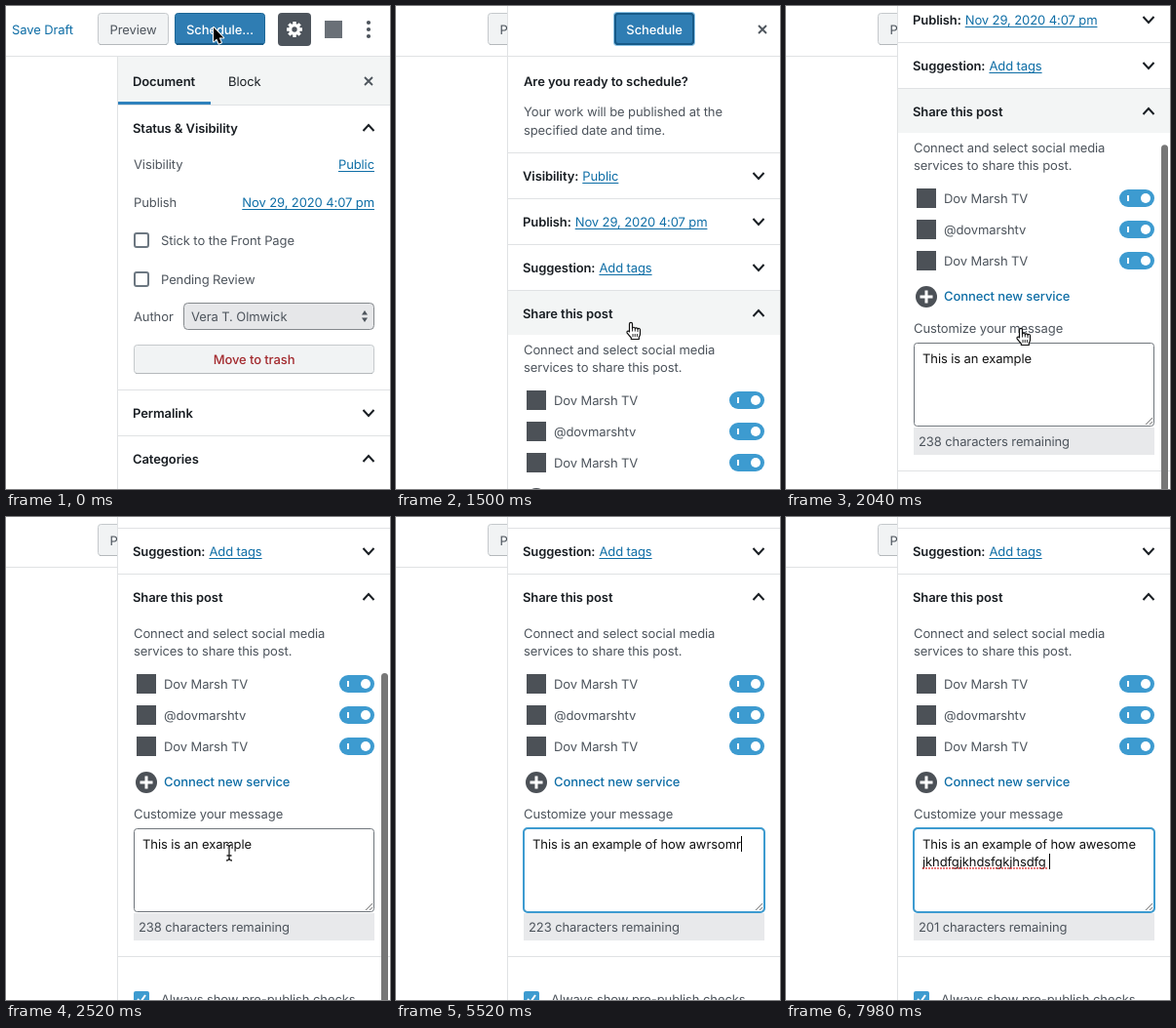
An HTML page with a canvas for the animation above (8000 ms loop, 394x495 px).

```html
<!DOCTYPE html>
<html lang="en">
<head>
<meta charset="utf-8">
<title>Schedule a post and share it</title>
<style>
  html, body { margin: 0; width: 100%; height: 100%; overflow: hidden; background: #fff; }
  canvas { display: block; width: 394px; height: 495px; }
</style>
</head>
<body>
<canvas id="stage"></canvas>
<script>
const W = 394, H = 495, LOOP = 8000;
const canvas = document.getElementById('stage');
const ctx = canvas.getContext('2d');
const dpr = window.devicePixelRatio || 1;
canvas.width = W * dpr;
canvas.height = H * dpr;

const INK = '#191e23', BODY = '#4d545c', LINK = '#0f6ea6', LINE = '#e0e2e4';
const BLUE = '#3d9bd0', HOVER = '#f3f5f5', BUTTON = '#2f7db3', ICON = '#4c5157';
const CHANNEL = 'Dov Marsh TV', HANDLE = '@dovmarshtv', AUTHOR = 'Vera T. Olmwick';
const DATE = 'Nov 29, 2020 4:07 pm';

const PANEL_AT = 300, SHARE_AT = 1260, SCROLL_AT = 1680, FOCUS_AT = 2820, TYPE_AT = 3480;
const MAX_SCROLL = 233;

const clamp = v => Math.max(0, Math.min(1, v));
const progress = (t, start, length) => clamp((t - start) / length);
const easeOut = p => 1 - (1 - p) ** 3;
const easeInOut = p => p * p * (3 - 2 * p);

// ---- drawing helpers ----
function setFont(weight) {
  ctx.font = `${weight} 13px Inter, "Open Sans", sans-serif`;
  ctx.letterSpacing = '-0.1px';
  ctx.textRendering = 'geometricPrecision';
}

// y is the middle of the capitals; returns the text width
function label(str, x, y, color = BODY, weight = 400, align = 'left') {
  setFont(weight);
  ctx.textAlign = align;
  ctx.fillStyle = color;
  ctx.fillText(str, x, y + 5);
  return ctx.measureText(str).width;
}

function link(str, x, y, align = 'left') {
  const w = label(str, x, y, LINK, 400, align);
  rect(align === 'right' ? x - w : x, y + 7, w, 1, LINK);
}

function rect(x, y, w, h, color) {
  ctx.fillStyle = color;
  ctx.fillRect(x, y, w, h);
}

function box(x, y, w, h, r, fill, stroke, lw = stroke ? 1 : 0) {
  ctx.beginPath();
  ctx.roundRect(x + lw / 2, y + lw / 2, w - lw, h - lw, r);
  if (fill) { ctx.fillStyle = fill; ctx.fill(); }
  if (stroke) { ctx.strokeStyle = stroke; ctx.lineWidth = lw; ctx.stroke(); }
}

function disc(x, y, r, color) {
  ctx.fillStyle = color;
  ctx.beginPath();
  ctx.arc(x, y, r, 0, 7);
  ctx.fill();
}

function lines(color, lw, ...paths) {
  ctx.strokeStyle = color;
  ctx.lineWidth = lw;
  ctx.beginPath();
  for (const p of paths) {
    ctx.moveTo(p[0], p[1]);
    for (let i = 2; i < p.length; i += 2) ctx.lineTo(p[i], p[i + 1]);
  }
  ctx.stroke();
}

function chevron(y, up) {
  const d = up ? -3 : 3;
  lines(INK, 2, [366.5, y - d, 372, y + d, 377.5, y - d]);
}

function cross(x, y, r = 4) {
  lines(BODY, 1.8, [x - r, y - r, x + r, y + r], [x + r, y - r, x - r, y + r]);
}

function greyButton(x, y, w, h) {
  box(x, y, w, h, 3, '#f1f3f4', '#c5c9cc');
  rect(x + 2, y + h - 1, w - 4, 1, '#b5b9bc');
}

function blueButton(x, y, w, h, str) {
  box(x, y, w, h, 3, BUTTON, '#1c6595');
  rect(x + 2, y + h - 2, w - 4, 2, '#1a5d8a');
  label(str, x + w / 2, 24, '#fff', 500, 'center');
}

function gear(x, y) {
  ctx.save();
  ctx.translate(x, y);
  for (let i = 0; i < 8; i++) {
    rect(-1.7, -8, 3.4, 4, '#fff');
    ctx.rotate(Math.PI / 4);
  }
  disc(0, 0, 6, '#fff');
  disc(0, 0, 2.7, BODY);
  ctx.restore();
}

// ---- editor behind the panel ----
function drawHeader(t) {
  if (t < PANEL_AT) label('Save Draft', 6, 24, LINK);
  greyButton(94, 7, 73, 33);
  label('Preview', 130.5, 24, BODY, 400, 'center');
  blueButton(173, 7, 93, 33, 'Schedule…');
  box(279, 7, 34, 34, 4, BODY);
  gear(296, 24);
  rect(327, 15, 18, 18, '#6a7077');
  for (const y of [17, 24, 31]) disc(372, y, 2.1, BODY);
  rect(0, 51, W, 1, LINE);
}

function checkbox(y, str) {
  box(131, y - 8, 16, 16, 2, '#fff', '#6c7781', 2);
  label(str, 159, y);
}

function drawSidebar() {
  rect(114, 52, 1, H, LINE);
  rect(115, 52, W, 49, HOVER);
  rect(115, 101, W, 1, LINE);
  rect(115, 98, 95, 3, '#2f82bd');
  label('Document', 130, 77, INK, 600);
  label('Block', 228, 77, INK);
  cross(372, 77);

  label('Status & Visibility', 130, 125, INK, 600);
  chevron(125, true);
  label('Visibility', 131, 162);
  link('Public', 378, 162, 'right');
  label('Publish', 131, 201);
  link(DATE, 378, 201, 'right');
  checkbox(240, 'Stick to the Front Page');
  checkbox(280, 'Pending Review');

  label('Author', 131, 318);
  box(182, 304, 196, 28, 4, '#e6e7e9', '#85898d');
  label(AUTHOR, 190, 318);
  ctx.fillStyle = BODY;
  for (const d of [-1, 1]) {
    ctx.beginPath();
    ctx.moveTo(365, 318 + d * 1.5);
    ctx.lineTo(371, 318 + d * 1.5);
    ctx.lineTo(368, 318 + d * 6);
    ctx.fill();
  }

  greyButton(131, 347, 247, 30);
  label('Move to trash', 254.5, 362, '#a32a2e', 500, 'center');
  rect(115, 393, W, 1, LINE);
  label('Permalink', 130, 417, INK, 600);
  chevron(417, false);
  rect(115, 440, W, 1, LINE);
  label('Categories', 130, 464, INK, 600);
  chevron(464, true);
}

// ---- typed message ----
const GIBBERISH = 'jkhdfgjkhdsfgkjhsdfg';

function message(t) {
  const typed = (str, start, step) => str.slice(0, Math.max(0, Math.floor((t - start) / step) + 1));
  if (t < TYPE_AT) return 'This is an example';
  let str = 'This is an example ' + typed('of how awrsomr', 3700, 139);
  const removed = Math.min(5, Math.floor((t - 5880) / 70) + 1);
  if (removed > 0) str = str.slice(0, -removed);
  return str + typed('esome', 6300, 80) + typed(` ${GIBBERISH} `, 6700, 58);
}

function drawMessage(t) {
  const focused = t >= FOCUS_AT;
  const str = message(t);
  box(131, 552, 247, 86, 3, '#fff', '#70767c');
  if (focused) box(130, 551, 249, 88, 4, null, BLUE, 2);
  lines('#777', 1, [369, 636, 376, 629], [373, 636, 376, 633]);

  setFont(400);
  let rows = [str];
  const cut = str.indexOf(' j');
  if (cut > 0 && ctx.measureText(str.trimEnd()).width > 229)
    rows = [str.slice(0, cut), str.slice(cut + 1)];
  rows.forEach((row, i) => label(row, 140, 568 + i * 18, '#111'));

  const last = rows[rows.length - 1], y = 568 + (rows.length - 1) * 18;
  if (focused) rect(Math.round(140 + ctx.measureText(last).width), y - 8, 1, 16, '#000');
  if (str.endsWith(GIBBERISH + ' ')) {
    const w = ctx.measureText(GIBBERISH).width;
    for (let x = 0; x < w; x += 3) disc(141 + x, y + 7, 0.9, '#e0393b');
  }

  rect(131, 639, 247, 28, '#e8e9eb');
  label(`${256 - str.length} characters remaining`, 136, 653);
}

// ---- pre-publish panel ----
function toggle(y) {
  box(342, y - 9, 36, 18, 9, BLUE);
  rect(350, y - 3, 2, 6, '#fff');
  disc(369, y, 5, '#fff');
}

function service(y, name) {
  rect(134, y - 10, 20, 20, ICON);
  label(name, 162, y);
  toggle(y);
}

function row(y, title, value) {
  const w = label(title, 130, y, INK, 600);
  if (value) link(value, 130 + w + 4, y);
  chevron(y, false);
  rect(115, y + 23, W, 1, LINE);
}

function drawShare(t) {
  label('Connect and select social media', 131, 352);
  label('services to share this post.', 131, 370);
  service(404, CHANNEL);
  service(436, HANDLE);
  service(468, CHANNEL);
  disc(144, 505, 11, ICON);
  rect(137.5, 503.5, 13, 3, '#fff');
  rect(142.5, 498.5, 3, 13, '#fff');
  label('Connect new service', 162, 504, LINK, 500);
  label('Customize your message', 131, 537);
  drawMessage(t);
  rect(115, 683, W, 1, LINE);
  box(131, 719, 16, 16, 2, BLUE);
  lines('#fff', 2, [135, 727, 138, 730, 143, 723]);
  label('Always show pre-publish checks', 159, 727);
}

function drawPanel(t, scroll) {
  const slide = 280 * (1 - easeOut(progress(t, PANEL_AT, 100)));
  ctx.save();
  ctx.translate(slide, 0);
  rect(114, 0, 280, H, '#fff');
  rect(114, 0, 1, H, LINE);
  ctx.beginPath();
  ctx.rect(115, 0, 279, H);
  ctx.clip();
  ctx.translate(0, -scroll);

  box(223, 6, 84, 35, 4, '#8cc3e6');
  blueButton(224, 7, 82, 33, 'Schedule');
  box(224, 7, 82, 33, 3, null, '#175a88', 2);
  cross(376, 24);
  rect(115, 51, W, 1, LINE);
  label('Are you ready to schedule?', 131, 77, INK, 600);
  label('Your work will be published at the', 131, 108);
  label('specified date and time.', 131, 127);
  rect(115, 150, W, 1, LINE);
  row(174, 'Visibility:', 'Public');
  row(221, 'Publish:', DATE);
  row(268, 'Suggestion:', 'Add tags');

  const open = t >= SHARE_AT;
  if (t > 1000 && t < 2340) rect(115, 292, W, 45, HOVER);
  label('Share this post', 130, 315, INK, 600);
  chevron(315, open);
  if (open) drawShare(t);
  else rect(115, 338, W, 1, LINE);
  ctx.restore();

  ctx.globalAlpha = progress(t, SCROLL_AT, 60) * (1 - progress(t, 2700, 240));
  box(385, 1.6 + 0.68 * scroll, 7, 355, 3.5, '#777');
  ctx.globalAlpha = 1;
}

// ---- pointer ----
const arrow = new Path2D('M0 0V14.5L3.2 11.5L5.4 16.6L7.9 15.5L5.7 10.6H10.2Z');
const hand = new Path2D('M3.5 10V1.8a1.5 1.5 0 0 1 3 0V6.5a1.4 1.4 0 0 1 2.8 .3a1.4 1.4 0 0 1 2.7 .5' +
  'a1.3 1.3 0 0 1 2.5 .6V12q0 2-1.2 3.2V17.5H5.3V16Q3.5 14 1 10.8a1.3 1.3 0 0 1 2.5-.8Z');
const creases = new Path2D('M6.5 6.5V9.5M9.3 7V9.5M12 7.5V10M7 12V15M9.2 12V15M11.4 12V15');
const beam = new Path2D('M-3 -8Q0 -8 0 -5V5Q0 8 -3 8M3 -8Q0 -8 0 -5M0 5Q0 8 3 8M-2.5 3H2.5');

const moves = [
  [0, 213, 22], [360, 213, 22], [1080, 240, 325], [1700, 240, 325],
  [1980, 240, 331], [2300, 240, 331], [2480, 229, 344], [LOOP, 229, 344]
];

function drawPointer(t) {
  if (t >= TYPE_AT) return;
  const i = moves.findIndex((m, k) => t < moves[k + 1][0]);
  const [t0, x0, y0] = moves[i], [t1, x1, y1] = moves[i + 1];
  const p = easeInOut((t - t0) / (t1 - t0));
  const x = x0 + (x1 - x0) * p, y = y0 + (y1 - y0) * p;

  const stroke = (path, color, lw) => {
    ctx.strokeStyle = color;
    ctx.lineWidth = lw;
    ctx.stroke(path);
  };
  ctx.save();
  ctx.translate(x, y);
  ctx.lineJoin = 'round';
  if (t >= 2400) {
    stroke(beam, '#fff', 3);
    stroke(beam, '#222', 1.3);
  } else if (y > 150) {
    ctx.translate(-4, -1);
    ctx.fillStyle = '#fff';
    ctx.fill(hand);
    stroke(hand, '#111', 1.2);
    stroke(creases, '#111', 0.9);
  } else {
    stroke(arrow, '#fff', 2);
    ctx.fillStyle = '#000';
    ctx.fill(arrow);
  }
  ctx.restore();
}

function draw(t) {
  ctx.setTransform(dpr, 0, 0, dpr, 0, 0);
  rect(0, 0, W, H, '#fff');
  drawHeader(t);
  drawSidebar();
  if (t >= PANEL_AT) drawPanel(t, Math.round(MAX_SCROLL * easeOut(progress(t, SCROLL_AT, 694))));
  drawPointer(t);
}

const start = performance.now();
function tick() {
  draw((performance.now() - start) % LOOP);
  requestAnimationFrame(tick);
}
tick();
</script>
</body>
</html>
```
